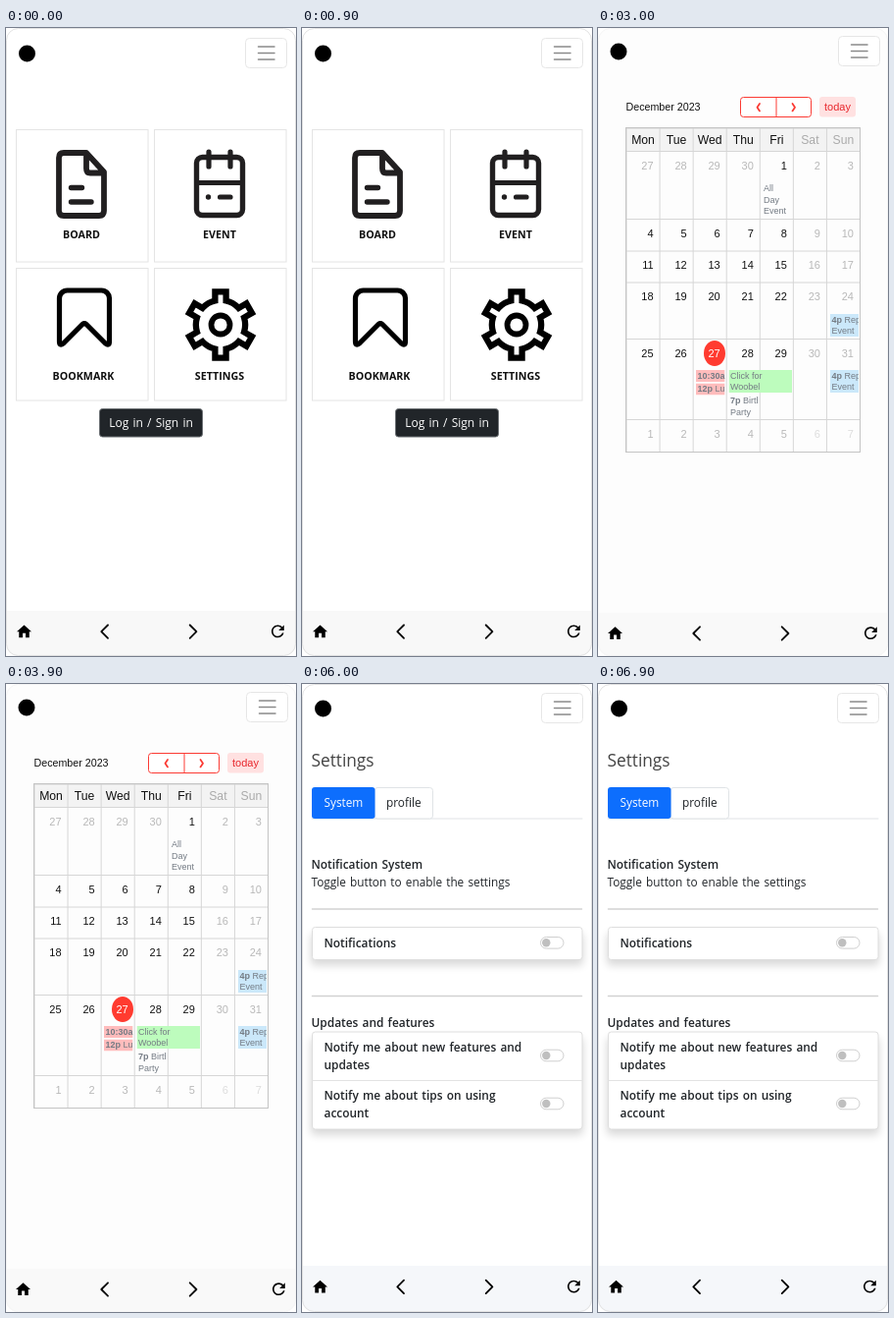
Write an HTML page that moves like this. It is 296 px wide and 639 px high and loops after 7.5 s.

```html
<!DOCTYPE html>
<html lang="en">
<head>
<meta charset="utf-8">
<title>Mobile app tour</title>
<style>
html, body { margin: 0; width: 100%; height: 100%; overflow: hidden; background: #fff; }
svg { display: block; }
#stage { width: 100%; height: 100%; }
text { font: 11.8px "Open Sans", "Noto Sans", sans-serif; word-spacing: 1.1px; fill: #212529; white-space: pre; }
.cal text { font-family: "Liberation Sans", Arial, sans-serif; word-spacing: 0; }
.line { fill: none; stroke-linecap: round; stroke-linejoin: round; }
</style>
</head>
<body>
<svg id="stage" viewBox="0 0 296 639">
  <defs>
    <clipPath id="card"><rect width="296" height="639" rx="12"/></clipPath>
    <filter id="soft" x="-10%" y="-60%" width="120%" height="240%"><feGaussianBlur stdDeviation="4.5"/></filter>
  </defs>
  <g id="screen" clip-path="url(#card)"></g>
  <rect id="edge" x=".5" y=".5" width="295" height="638" rx="12" fill="none"/>
</svg>
<script>
const HOLD = 1500;

const rect = (x, y, w, h, fill, stroke = 'none', r = 0, more = '') =>
  `<rect x="${x}" y="${y}" width="${w}" height="${h}" rx="${r}" fill="${fill}" stroke="${stroke}" ${more}/>`;
const text = (x, y, s, style = '') => `<text x="${x}" y="${y}" style="${style}">${s}</text>`;
const line = (d, color, width = 1) =>
  `<path class="line" d="${d}" stroke="${color}" stroke-width="${width}"/>`;
const circle = (x, y, r, fill) => `<circle cx="${x}" cy="${y}" r="${r}" fill="${fill}"/>`;
const move = (x, y, content) => `<g transform="translate(${x} ${y})">${content}</g>`;
const bold = 'font-weight:600;font-size:11.9px';
const middle = 'text-anchor:middle';

function header(logoX, logoY, x, y, focused) {
  const box = focused
    ? rect(x - 1, y - 1.5, 45, 33, '#fff', '#777', 4, 'stroke-width="3"')
    : rect(x, y, 42, 30, '#fff', '#e6e6e6', 4);
  const bars = [8.5, 15, 21.5].map(dy => `M${x + 13} ${y + dy}h16.5`).join('');
  return circle(logoX, logoY, 8.5, '#000') + box + line(bars, '#8a8a8a', 1.5);
}

function navBar(top, fill, dy, dx = 0, refreshDx = 0) {
  return rect(0, top, 296, 639 - top, fill) + move(0, dy,
    `<path transform="translate(${9.5 + dx} 605.3) scale(.75)" d="M10 20v-6h4v6h5v-8h3L12 3 2 12h3v8z"/>` +
    line('M104 607.5l-6.7 6.7l6.7 6.7M187.7 607.5l6.7 6.7l-6.7 6.7', '#000', 1.8) +
    `<path transform="translate(${267.8 + refreshDx} 604.3) scale(.8)" d="M17.65 6.35C16.2 4.9 14.21 4 12 4c-4.42 0-7.99 3.58-7.99 8s3.57 8 7.99 8c3.73 0 6.84-2.55 7.73-6h-2.08c-.82 2.33-3.04 4-5.65 4-3.31 0-6-2.69-6-6s2.69-6 6-6c1.66 0 3.14.69 4.22 1.78L13 11h7V4z"/>`);
}

function gear(cx, cy) {
  const point = (x, y, a) => {
    const c = Math.cos(a), s = Math.sin(a);
    return `${(cx + x * c - y * s).toFixed(2)} ${(cy + x * s + y * c).toFixed(2)}`;
  };
  let d = '';
  for (let k = 0; k < 6; k++) {
    const a = k * Math.PI / 3;
    d += `${k ? 'A25 25 0 0 1 ' : 'M'}${point(-5.6, -24.5, a)}L${point(-5.6, -33.7, a)}` +
      `L${point(5.6, -33.7, a)}L${point(5.6, -24.5, a)}`;
  }
  d += `A25 25 0 0 1 ${point(-5.6, -24.5, 0)}Z`;
  return `<path d="${d}" fill="none" stroke="#000" stroke-width="6.3"/>` +
    `<circle cx="${cx}" cy="${cy}" r="9.5" fill="none" stroke="#000" stroke-width="5.8"/>`;
}

function tiles() {
  const ink = '#211f20';
  const caption = (x, y, s) => text(x, y, s, `${middle};font-size:10.7px;font-weight:700;fill:#111`);
  return [[10.5, 103.5], [151.5, 103.5], [10.5, 244.5], [151.5, 244.5]]
    .map(([x, y]) => rect(x, y, 134.5, 134.5, '#fff', '#e4e4e4')).join('') +
    line('M82 127H59Q54 127 54 132V186Q54 191 59 191H95Q100 191 100 186V146.5ZM82 128V143Q82 147.5 86 147.5H99', ink, 5.8) +
    line('M66.5 162.5H77.5M66.5 177H87', ink, 5.4) +
    rect(194.5, 131.5, 47, 59, 'none', ink, 6, 'stroke-width="5.4"') +
    line('M207 126V141M229 126V141M195 157.5H241M218.5 172H229', ink, 5.2) +
    circle(206.5, 172, 2.7, ink) +
    line('M54.5 319V275a8 8 0 0 1 8-8h35a8 8 0 0 1 8 8V319q0 5-4 2L82 301.5q-2-1.6-4 0L58.5 321q-4 3-4-2z', '#000', 5.2) +
    gear(219, 302) +
    caption(77, 214, 'BOARD') + caption(218, 213.5, 'EVENT') +
    caption(79, 357.5, 'BOOKMARK') + caption(218, 357.5, 'SETTINGS');
}

function home() {
  return header(21.5, 26, 244.5, 10.5) + tiles() +
    rect(95.5, 387.5, 105, 28.5, '#212529', '#6b6f73', 3) +
    text(148, 406, 'Log in / Sign in', middle + ';font-size:12px;fill:#fff') +
    navBar(593, '#f8f8f8', 0);
}

function postForm() {
  const border = '#d8dbdf';
  const field = (y, label, value, color) => text(1, y - 4.5, label) +
    rect(1.5, y + .5, 293, 28, '#fff', border, 3) + text(11, y + 18.5, value, 'fill:' + color);
  const area = (y, h, label) => text(1, y - 5, label) + rect(1.5, y, 293, h, '#fff', border, 3) +
    line(`M290 ${y + h - 1}l4-4M292.5 ${y + h - 1}l1.5-1.5`, '#999', .6);
  const button = (x, w, label, fill, color) => rect(x, 499.5, w, 29, fill, 'none', 3) +
    text(x + w / 2, 518.5, label, `${middle};fill:${color}`);
  return header(21.5, 25, 244.5, 9.5) +
    field(66, 'Title', 'title', '#777d83') + field(112.7, 'Name', 'name', '#777d83') +
    field(159.5, 'School', 'school', '#777d83') + field(206.5, 'Category', 'Studying', '#212529') +
    area(253.5, 64.5, 'Summary (Shows up in card preview)') + area(336.5, 155, 'Content') +
    button(191, 55, 'Cancel', '#0dcaf0', '#000') + button(252, 43, 'Post', '#0d6efd', '#fff') +
    navBar(592, '#f5f8fc', -.8);
}

function calendar() {
  const left = 29, step = 34.07;
  const rows = [102, 125.5, 194.5, 227, 259, 316.5, 398.5, 431.5];
  const red = '#fb3b34', grid = '#d6d6d6';
  const chip = (x, y, w, h, fill, lines) =>
    `<svg x="${x}" y="${y}" width="${w}" height="${h}">${rect(0, 0, w, h, fill)}` +
    lines.map((s, i) => text(1.5, 8.5 + i * 11.5, s, 'font-size:9px;fill:#747b84')).join('') + '</svg>';
  const strong = s => `<tspan font-weight="700">${s}</tspan>`;

  let out = rect(left, 102, step * 7, 23.5, '#f3f3f3');
  ['Mon', 'Tue', 'Wed', 'Thu', 'Fri', 'Sat', 'Sun'].forEach((day, i) => {
    out += text(left + step * (i + .5), 118, day, `${middle};font-size:12.2px;fill:${i > 4 ? '#aaa' : '#111'}`);
  });
  let lines = rows.map(y => `M${left} ${y}h${step * 7}`).join('');
  for (let i = 0; i < 8; i++) lines += `M${left + step * i} 102V431.5`;
  out += line(lines, grid) + rect(28.5, 101.5, 239, 330, 'none', '#c4c4c4');
  out += `<ellipse cx="119" cy="331" rx="11" ry="13" fill="#ff3b30"/>`;

  for (let i = 0; i < 42; i++) {
    const col = i % 7, row = Math.floor(i / 7);
    const n = i < 4 ? 27 + i : (i - 4) % 31 + 1;
    const other = i < 4 || i > 34;
    const color = n === 27 && !other ? '#fff' : i > 39 ? '#ddd' : other || col > 4 ? '#b8b8b8' : '#111';
    out += text(left + step * (col + 1) - 6.5, rows[row + 1] + 18.3, n, `text-anchor:end;font-size:11px;fill:${color}`);
  }
  out += chip(167.5, 157.5, 31, 34, 'none', ['All', 'Day', 'Event']);
  for (const y of [291, 348])
    out += chip(237, y, 29, 23, '#cbe8fa', [strong('4p') + ' Repeating', 'Event']);
  out += chip(100, 348, 29.5, 12, '#ffbcbc', [strong('10:30a') + ' Meeting']) +
    chip(100, 361.5, 29.5, 12, '#ffbcbc', [strong('12p') + ' Lunch']) +
    chip(133.5, 348, 64.5, 23, '#bdfcbd', ['Click for', 'Woobel']) +
    chip(133.5, 373.5, 29.5, 24, 'none', [strong('7p') + ' Birthday', 'Party']);

  const toolbar = text(28.5, 84, 'December 2023', 'font-size:10.7px;fill:#111') +
    rect(145.5, 70.5, 72, 20, '#fff', red, 3) + line('M182 70.5V90.5', red) +
    line('M165 77l-2.5 3.7l2.5 3.7M198.5 77l2.5 3.7l-2.5 3.7', red, 1.8) +
    rect(226, 70, 37, 20.5, '#ffe1e1', 'none', 3) +
    text(244.5, 84, 'today', `${middle};font-size:11px;fill:#e8262c`);

  return rect(0, 0, 296, 639, '#fdfdfd') + header(21, 24, 245.5, 8.5) +
    `<g class="cal">${toolbar}${out}</g>` + navBar(595, '#f9f9f9', 1.8, -1, 1);
}

function menu() {
  const items = ['Home', 'About', 'Make a post', 'Board', 'Bookmarks', 'Settings', 'Log out'];
  return header(21, 25, 244, 9.5, true) + rect(9, 42, 277, 250, '#f9fafa') +
    items.map((s, i) => text(21, 71.7 + i * 34.65, s, 'font-size:14.9px;fill:#7f8181')).join('') +
    text(21, 330, 'Hi,', 'font-size:20px;fill:#3d444d') +
    move(-.8, 249.5, tiles()) + navBar(593, '#f8f9fa', 0, -1);
}

function settings() {
  const card = (y, h) => rect(9, y + 6, 278, h, '#000', 'none', 4, 'opacity=".15" filter="url(#soft)"') +
    rect(10.5, y, 275.5, h, '#fff', '#dedede', 3);
  const toggle = y => rect(243.5, y - 5.8, 23.5, 11.6, '#fff', '#cfcfcf', 5.8) + circle(249.3, y, 4.2, '#bfbfbf');
  return header(21.5, 25, 244.5, 9.5) +
    text(9.5, 83.5, 'Settings', 'font-size:17.3px;fill:#444') +
    line('M10 137H286', '#e0e3e6') +
    rect(74, 105.5, 59.5, 31.5, '#fff', '#e0e3e6', 3) +
    rect(10, 105, 64.5, 32, '#0d6efd', 'none', 3) +
    text(22.5, 125, 'System', 'fill:#fff') + text(86, 125, 'profile') +
    text(9.5, 188, 'Notification System', bold) +
    text(9.5, 206, 'Toggle button to enable the settings') +
    line('M10.5 229H285.5M10.5 317.5H285.5', '#d2d2d2', 1.6) +
    card(247.5, 33) + text(22.5, 268.3, 'Notifications', bold) + toggle(263.3) +
    text(9.5, 349, 'Updates and features', bold) +
    card(354, 99) + line('M11 403.5H285.5', '#e2e2e2') +
    text(22.5, 373.5, 'Notify me about new features and', bold) + text(22.5, 392, 'updates', bold) +
    text(22.5, 423, 'Notify me about tips on using', bold) + text(22.5, 441, 'account', bold) +
    toggle(378) + toggle(427) + navBar(592, '#f5f7fa', -.8);
}

const scenes = [home, postForm, calendar, menu, settings];
const screen = document.getElementById('screen');
const edge = document.getElementById('edge');
let shown = -1;

function render(time) {
  const index = Math.floor(time / HOLD) % scenes.length;
  if (index === shown) return;
  shown = index;
  screen.innerHTML = scenes[index]();
  edge.setAttribute('stroke', scenes[index] === calendar ? '#f6f6f6' : '#e3e3e3');
}

const start = performance.now();
function tick() {
  render(performance.now() - start);
  requestAnimationFrame(tick);
}
tick();
</script>
</body>
</html>
```
